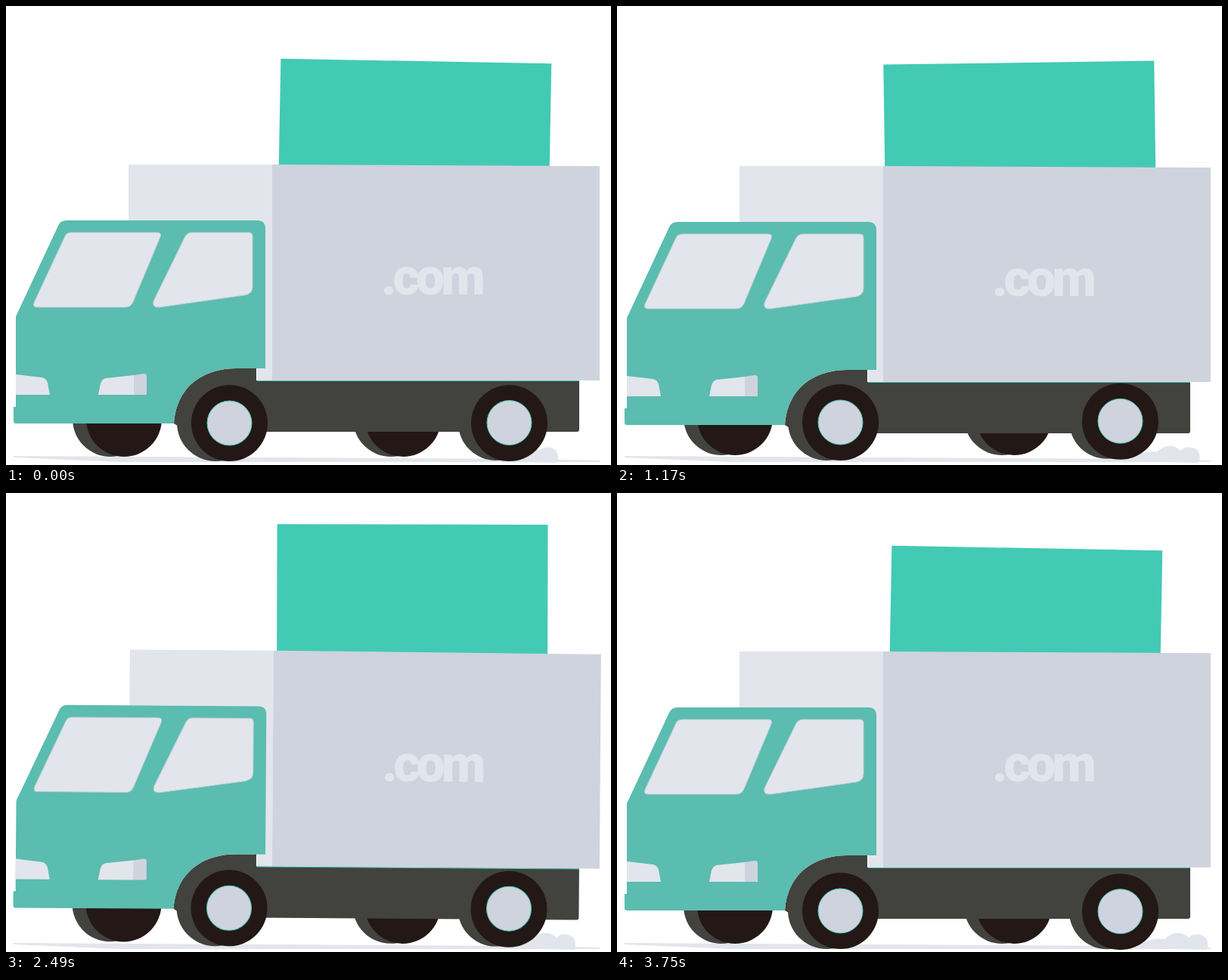
An HTML page for the animation above (3.78 s loop, 800 px wide and 608 px high).

```html
<!DOCTYPE html>
<html lang="en">
<head>
<meta charset="utf-8">
<title>Delivery truck</title>
<style>
  html, body { margin: 0; width: 100%; height: 100%; overflow: hidden; background: #fff; }
  svg { display: block; width: 800px; height: 608px; }
  .light { fill: #e2e5ec; }
  .grey { fill: #cfd3de; }
  .teal { fill: #5bbcb0; }
  .dark { fill: #42423e; }
  .tyre { fill: #231815; }
  .glass { fill: #e2e5ec; stroke: #b9cfd2; }
  .hub { fill: #cfd3de; stroke: #43cab4; }
  text { font: 800 68px Roboto, sans-serif; letter-spacing: -5px; }
</style>
</head>
<body>
<svg viewBox="0 0 800 608">
  <path class="light" d="M10 596L350 598L690 600L785 602V604H150L10 598Z"/>
  <path id="smoke" class="light" d="M-90 598Q-72 588 -57 591Q-40 575 -25 589A14 12 0 0 1 0 597V602Q0 605 -4 605L-90 603Z"/>
  <g id="truck">
    <rect id="cargo" x="357" y="73" width="358" height="358" fill="#43cab4"/>
    <g id="farWheels">
      <circle class="dark" cx="138" cy="547" r="50"/>
      <circle class="tyre" cx="156" cy="547" r="50"/>
      <circle class="dark" cx="509" cy="547" r="50"/>
      <circle class="tyre" cx="525" cy="547" r="50"/>
    </g>
    <g id="body">
      <path class="dark" d="M222 553C225 505 260 480 305 480H331V496H758V561Q758 564 755 564H240Z"/>
      <path class="light" d="M162 210H352V496H332V300H162Z"/>
      <path class="grey" d="M352 210L785 212V496H352Z"/>
      <path d="M332 496.5H758" stroke="#43cab4"/>
      <text class="light" x="496" y="382">.com</text>
      <path class="teal" d="M69 291Q72 284 80 284H332Q343 284 343 295V480H305C260 480 225 505 222 553H13Q10 553 10 550V531H13V412Q13 410 15 407Z"/>
      <path class="glass" d="M78 305Q80 300 87 300H200Q206 300 204 306L168 392Q165 399 158 399H41Q35 399 37 393Z"/>
      <path class="glass" d="M237 305Q240 300 246 300H321Q326 300 326 305V372Q326 381 316 383L203 399Q193 400 195 391Z"/>
      <path class="light" d="M13 488L47 492Q53 493 55 499L58 515H13Z"/>
      <path class="light" d="M122 515L125 500Q127 494 132 493L169 489V515Z"/>
      <path class="grey" d="M169 489L182 487Q186 487 186 490V515H169Z"/>
    </g>
    <g id="frontWheel">
      <circle class="dark" cx="277" cy="552" r="51"/>
      <circle class="tyre" cx="295.5" cy="552.5" r="50.5"/>
      <circle class="hub" cx="295.5" cy="552.5" r="29.5"/>
    </g>
    <g id="rearWheel">
      <circle class="dark" cx="648" cy="552" r="50"/>
      <circle class="tyre" cx="665.5" cy="552.5" r="50.5"/>
      <circle class="hub" cx="665.5" cy="552" r="29.5"/>
    </g>
  </g>
</svg>
<script>
  const LOOP = 3780, STEP = 30, PUFF = LOOP / 8;
  const HOP_START = 2430, HOP_TIME = 380, HOP_HEIGHT = 59;
  const TAU = Math.PI * 2;

  const place = (id, transform) =>
    document.getElementById(id).setAttribute("transform", transform);

  function draw(ms) {
    const step = Math.floor(ms % LOOP / STEP);
    const t = step * STEP;
    const angle = TAU * t / LOOP;

    // Engine rattle
    const bump = [0, 0, 2, 0, 2][step % 5];
    const bounce = Math.sin(step * TAU / 4);
    place("body", `translate(0 ${bump})`);
    place("farWheels", `translate(0 ${-bump})`);
    place("frontWheel", `translate(0 ${bounce})`);
    place("rearWheel", `translate(0 ${2.2 * bounce})`);

    // The cargo sways, hops once per loop and rocks the truck
    const u = Math.min(1, Math.max(0, (t - HOP_START) / HOP_TIME));
    const hop = 4 * u * (1 - u);
    const sway = Math.cos(angle) + 0.28 * Math.cos(2 * angle) - 0.225 + 1.2 * hop;
    place("cargo", `translate(0 ${bump - HOP_HEIGHT * hop}) rotate(${sway} 540 415)`);
    place("truck", `rotate(${0.47 * Math.sin(TAU * u)} 536 480)`);

    const puff = t % PUFF / PUFF;
    place("smoke", `translate(${730 + 51 * Math.min(1, puff / 0.6)} 0)`);
  }

  function tick() {
    draw(performance.now());
    requestAnimationFrame(tick);
  }
  tick();
</script>
</body>
</html>
```
